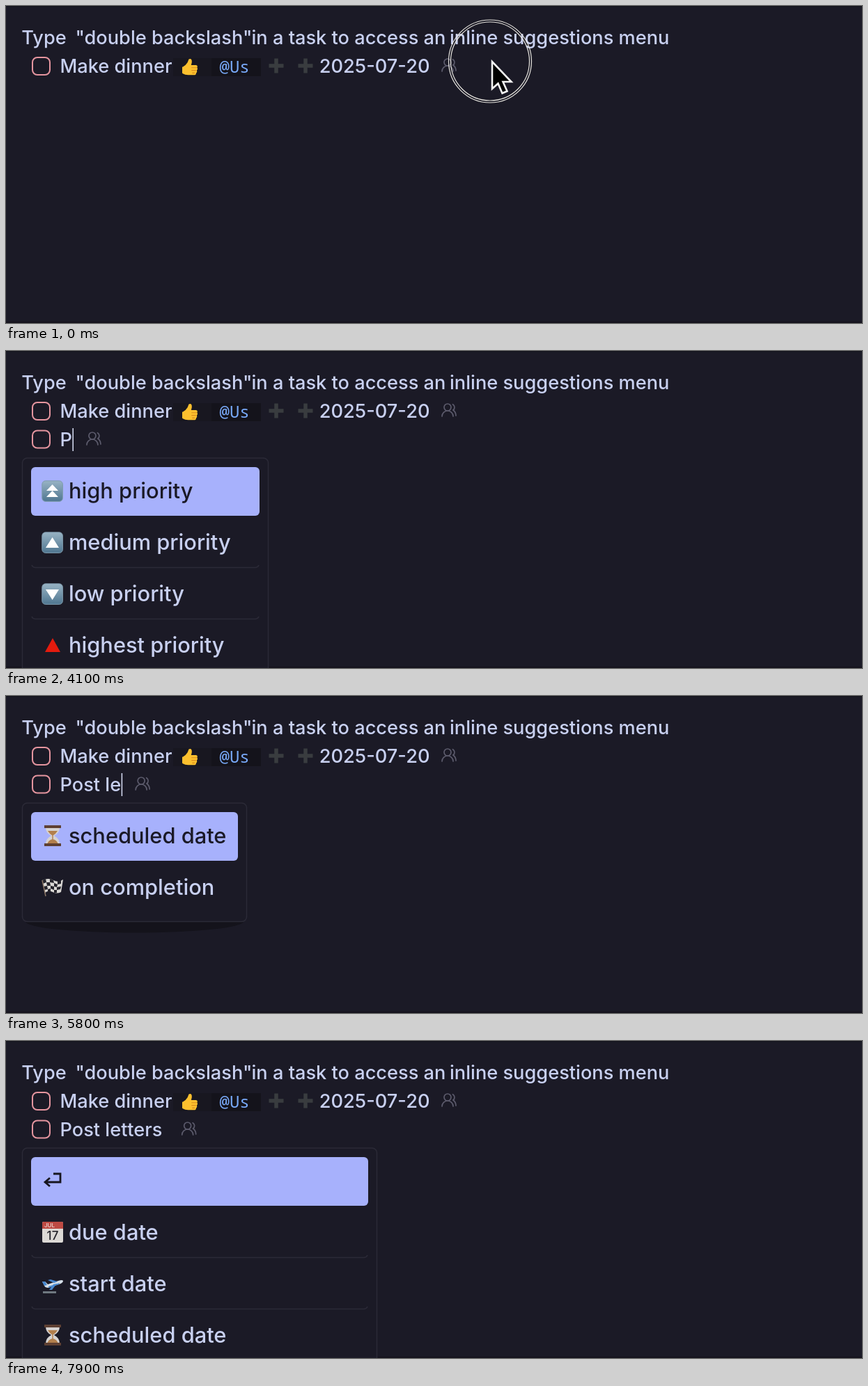
An HTML page for the animation above (8000 ms loop, 1229 by 456 pixels).

```html
<!DOCTYPE html>
<html lang="en">
<head>
<meta charset="utf-8">
<title>Inline task suggestions</title>
<style>
  html, body { margin: 0; width: 100%; height: 100%; overflow: hidden; background: #1b1a26; }
  svg { display: block; width: 100vw; height: 100vh; }
  text { font: 450 27.2px Inter, sans-serif; fill: #c8d0f0; white-space: pre; }
  .item { font-size: 30.8px; }
  .on { fill: #1a1926; }
  .tag { font: 24px "Noto Sans Mono", monospace; fill: #78a9f8; }
  .box { fill: none; stroke: #e5959f; stroke-width: 2; }
  .people { fill: none; stroke: #5c5b6c; stroke-width: 1.7; stroke-linecap: round; }
</style>
</head>
<body>
<svg viewBox="0 0 1229 456">
  <defs>
    <linearGradient id="steel" x2="0" y2="1">
      <stop stop-color="#98b3c4"/><stop offset="1" stop-color="#4f7690"/>
    </linearGradient>
    <rect id="check" class="box" x="38" y="-12.5" width="25" height="25" rx="7"/>
    <g id="people" class="people">
      <circle cx="9" cy="6" r="5"/>
      <path d="M17 19A8 8 0 0 0 1 19M21 18C21 14.600 19 11.500 17 10A5 5 0 0 0 16.500 1.700"/>
    </g>
    <path id="plus" d="M-10.5 0H10.5M0 -10.5V10.5" stroke="#393c3f" stroke-width="5.5"/>
    <rect id="button" x=".8" y="1.8" width="29.6" height="29.6" rx="5" fill="url(#steel)" stroke="#7f9bad"/>
    <g id="high"><use href="#button"/><path d="M15.600 7L24 16H7ZM15.600 16L24 25H7Z" fill="#fff"/></g>
    <g id="up"><use href="#button"/><path d="M15.600 9L25 24H6Z" fill="#fff"/></g>
    <g id="down"><use href="#button"/><path d="M15.600 25L25 10H6Z" fill="#fff"/></g>
    <g id="lowest"><use href="#button"/><path d="M15.600 26L24 17H7ZM15.600 17L24 8H7Z" fill="#fff"/></g>
    <path id="red" d="M16 6L27 26H5Z" fill="#e41b0e"/>
    <g id="glass">
      <path d="M6 4H26Q26 12 18 16Q26 20 26 28H6Q6 20 14 16Q6 12 6 4Z" fill="#d6d3d1"/>
      <path d="M9 9H23Q21 13 16 16Q11 13 9 9ZM8 28Q10 22 16 21Q22 22 24 28ZM15.3 15H16.7V23H15.3Z" fill="#b27f4c"/>
      <path d="M4 1H28V5H4ZM4 27H28V31H4Z" fill="#5e4033"/>
    </g>
    <g id="flag">
      <path d="M1 6Q10 2 17 6T31 5L28 23Q22 26 16 23T5 24Z" fill="#dad8d4"/>
      <path d="M1 6L6 4 7 9 2 11ZM12 4L17 6 18 10 12 9ZM23 7L28 6 28 11 23 12ZM7 9L12 9 13 14 8 14ZM18 10L23 12 22 16 18 15ZM3 15L8 14 9 19 4 20ZM13 14L18 15 18 20 13 18ZM22 16L28 15 27 19 22 20ZM9 19L13 18 13 22 9 23ZM18 20L22 20 22 24 18 24Z" fill="#24232a"/>
      <path d="M1 6L6 29" stroke="#8a7666" stroke-width="1.5"/>
    </g>
    <g id="cal">
      <rect x="1" y="1" width="30" height="30" rx="2" fill="#dcd9d5"/>
      <path d="M1 11V3Q1 1 3 1H29Q31 1 31 3V11Z" fill="#bd4a43"/>
      <text x="4" y="9" style="font-size:8px;fill:#eedad6">JUL</text>
      <text x="16" y="27" text-anchor="middle" style="font-size:17px;fill:#25242a">17</text>
    </g>
    <g id="plane">
      <path d="M2 27H21V30H2Z" fill="#6f7880"/>
      <path d="M1 13L5 13 9 17 24 12Q30 10 31 12Q31 15 25 17L10 22Q5 22 4 19Z" fill="#d5dfe9"/>
      <path d="M9 11L13 10 23 13 18 15ZM17 17L22 16 15 25 11 25ZM1 13L5 13 8 18 4 19ZM10 20L26 15 25 17 10 22Z" fill="#4687cf"/>
    </g>
    <path id="enter" d="M17 6H27V18H6M12 12L5 18L12 24" fill="none" stroke="#17161f" stroke-width="2.8"/>
  </defs>

  <rect width="1229" height="456" fill="#1b1a26"/>
  <path d="M0 .5H1229M0 455H1229" stroke="#13121b" stroke-width="1.5"/>
  <text y="55.3"><tspan x="22.3">Type</tspan><tspan x="99.5">"double backslash"</tspan><tspan x="352.5">in a task to access an</tspan><tspan x="637">inline suggestions menu</tspan></text>

  <use href="#check" y="86.5"/>
  <text x="77.5" y="96">Make dinner</text>
  <path d="M240 75H295V101H240Z" fill="#181720"/>
  <path d="M295 75H366V101H295Z" fill="#14131b"/>
  <g transform="translate(253 75.5) scale(.95)">
    <path d="M0 13Q5 11 8 6L10 1Q15 -1 14.5 6L13.5 10H21Q24 11 22.5 14Q24 16 22 18Q23 21 21 22Q21 25 18 25H9Q3 25 0 22Z" fill="#fcc02e"/>
    <path d="M14 14H22M14 18H21M15 22H19" stroke="#d98a1c" stroke-width="1.2"/>
  </g>
  <text class="tag" x="306.5" y="96">@Us</text>
  <use href="#plus" x="388" y="86"/>
  <use href="#plus" x="430" y="86"/>
  <text x="449.8" y="96">2025-07-20</text>
  <use href="#people" x="625" y="75"/>

  <g id="task">
    <use href="#check" y="127"/>
    <text id="typed" x="77.5" y="137"></text>
    <use id="helper" href="#people" y="116"/>
    <rect id="caret" y="111" width="1.5" height="33" fill="#d8def5"/>
  </g>
  <g id="menu"></g>

  <g id="ring" fill="none" stroke="#e6e4de" stroke-width="1.2">
    <circle cx="695" cy="79.5" r="59.5"/><circle cx="695" cy="79.5" r="56.5"/>
  </g>
  <path id="pointer" d="M698 80V119L706.5 111.5L712.5 125.5L719.5 122.5L713.5 109H725.5Z" fill="#000" stroke="#f4f4f4" stroke-width="2.6"/>
</svg>
<script>
const $ = id => document.getElementById(id);
const LOOP = 8000;

// left edge, width, rows as "icon|label"
const menus = {
  priority: [36, 328, 'high|high priority', 'up|medium priority', 'down|low priority', 'red|highest priority'],
  words: [92, 206, '|pos', '|POS', '|Pos', '|post'],
  all: [36, 484, 'enter|', 'cal|due date', 'plane|start date', 'glass|scheduled date'],
  l: [36, 297, 'glass|scheduled date', 'down|low priority', 'lowest|lowest priority', 'flag|on completion'],
  le: [36, 297, 'glass|scheduled date', 'flag|on completion'],
  let: [36, 278, 'flag|on completion'],
  letters: [157, 125, '|letters']
};

// time, typed text, open menu
const steps = [
  [0, ''],
  [3800, 'P', 'priority'],
  [4300, 'Po'],
  [4500, 'Pos', 'words'],
  [4700, 'Post', 'words'],
  [4900, 'Post ', 'words'],
  [5100, 'Post ', 'all'],
  [5300, 'Post l', 'l'],
  [5600, 'Post le', 'le'],
  [6300, 'Post let', 'let'],
  [6400, 'Post lett', 'letters'],
  [6500, 'Post lette', 'letters'],
  [6600, 'Post letter', 'letters'],
  [6700, 'Post letters', 'letters'],
  [7200, 'Post letters ', 'all']
];

const pen = document.createElement('canvas').getContext('2d');
const textWidth = s => {
  pen.font = getComputedStyle($('typed')).font;
  return pen.measureText(s).width;
};

function menuMarkup([x, w, ...rows]) {
  const bottom = 163 + rows.length * 74 + 13.5;
  let out = `<ellipse cx="${x + w / 2}" cy="${bottom}" rx="${w / 2 + 8}" ry="16" fill="#14131b"/>
    <rect x="${x - 12.5}" y="154" width="${w + 25}" height="${bottom - 154}" rx="7" fill="#1b1a26" stroke="#2b2a37" stroke-width="1.5"/>`;
  rows.forEach((row, i) => {
    const [icon, label] = row.split('|');
    const y = 167 + i * 74;
    if (!i) out += `<rect x="${x}" y="${y}" width="${w}" height="70" rx="6" fill="#a7b1fc"/>`;
    else if (i < rows.length - 1)
      out += `<path d="M${x + 1} ${y + 67}Q${x + 2} ${y + 70} ${x + 6} ${y + 70.5}H${x + w - 6}Q${x + w - 2} ${y + 70} ${x + w - 1} ${y + 67}" fill="none" stroke="#2b2a37" stroke-width="1.5"/>`;
    if (icon) out += `<use href="#${icon}" x="${x + 15}" y="${y + 18}"/>`;
    out += `<text class="item${i ? '' : ' on'}" x="${x + (icon ? 54 : 14.5)}" y="${y + 45.4}">${label}</text>`;
  });
  return out;
}

const show = (id, on) => { $(id).style.opacity = +on; };
let shown;

function setStep(step) {
  const [, text, menu] = step;
  const x = 78 + textWidth(text);
  $('typed').textContent = text;
  $('caret').setAttribute('x', x);
  $('helper').setAttribute('x', x + 19.5);
  show('helper', text !== '');
  $('menu').innerHTML = menu ? menuMarkup(menus[menu]) : '';
  shown = step;
}

function draw(now) {
  const t = now % LOOP;
  const step = steps.findLast(s => s[0] <= t);
  if (step !== shown) setStep(step);
  show('ring', Math.max(0, Math.min(1, (400 - t) / 300)));
  show('pointer', t < 1000);
  show('task', t >= 1900);
  show('caret', t < 2900 || (t >= 3400 && t < 7700));
  requestAnimationFrame(draw);
}
requestAnimationFrame(draw);
</script>
</body>
</html>
```
